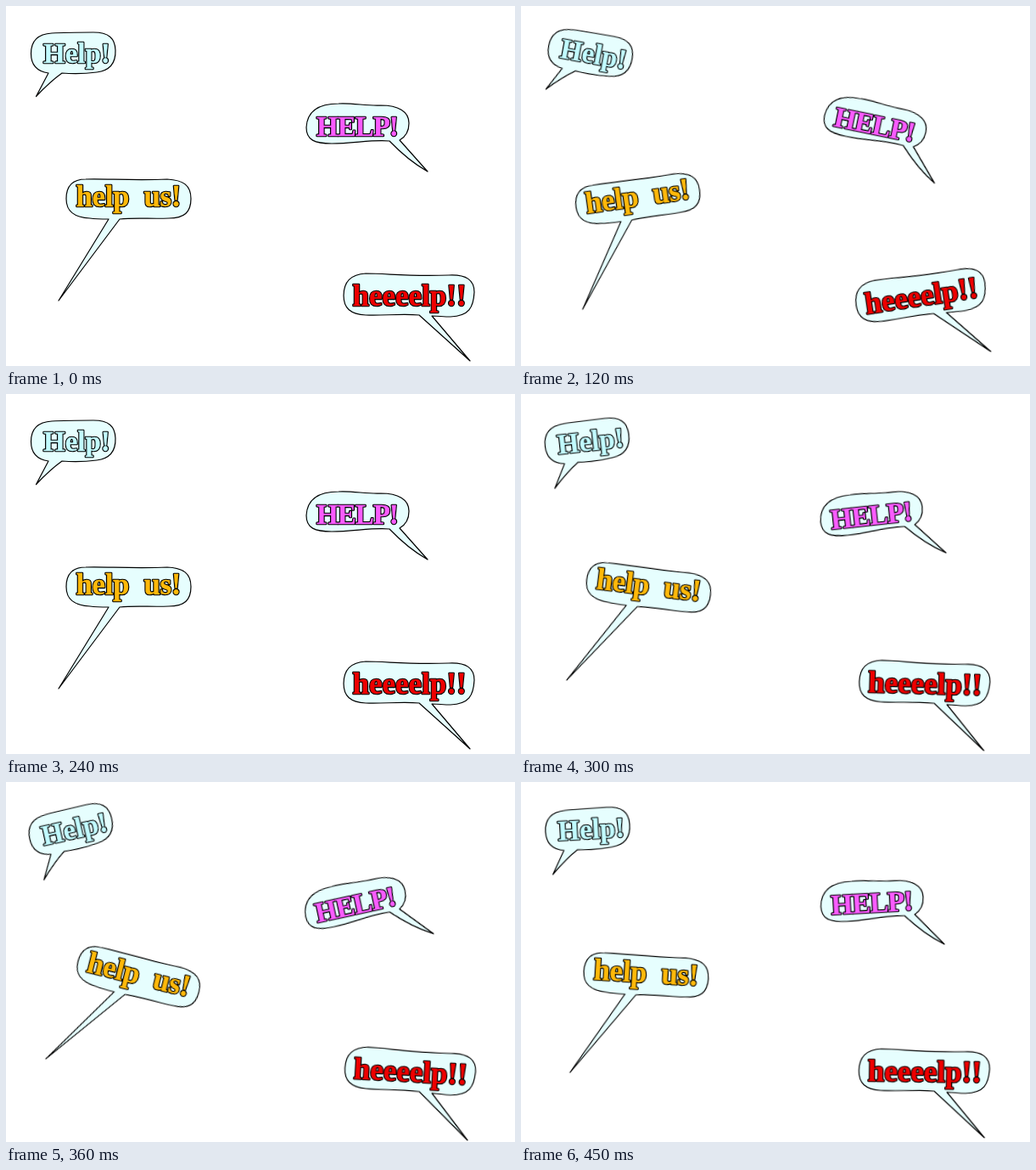
An HTML page for the animation above (480 ms loop, 600 px wide and 424 px high).

```html
<!DOCTYPE html>
<html lang="en">
<head>
<meta charset="utf-8">
<title>Help bubbles</title>
<style>
  html, body { margin: 0; width: 100%; height: 100%; overflow: hidden; background: #fff; }
  svg { display: block; width: 100%; height: 100%; }

  .bubble {
    transform-origin: var(--pivot);
    animation: rock 480ms infinite steps(4, end);
  }
  .bubble path {
    fill: #e6fefe;
    stroke: #000;
    stroke-width: 1.2;
    stroke-linejoin: round;
  }
  text {
    font: bold 35px "Liberation Serif", "Times New Roman", serif;
    stroke-linejoin: round;
  }
  .edge { fill: #000; stroke: #000; stroke-width: 2.6; }
  .face { fill: var(--ink); stroke: var(--ink); stroke-width: .3; }

  /* Each quarter of the loop moves in four hard steps */
  @keyframes rock {
    0%, 50%, 100% { transform: rotate(0deg); }
    25% { transform: rotate(var(--a)); }
    75% { transform: rotate(var(--b)); }
  }

  #one   { --pivot: 79.5px 68.5px;   --a: 10.4deg; --b: -12.5deg; --ink: #c2fbff; }
  #two   { --pivot: 425px 154.5px;   --a: 11.6deg; --b: -12.3deg; --ink: #f95cff; }
  #three { --pivot: 140px 275.5px;   --a: -8deg;   --b: 14deg;    --ink: #ffb90a; }
  #four  { --pivot: 475px 366.5px;   --a: -8.4deg; --b: 3.2deg;   --ink: #ee0000; }

  #say1 { font-size: 33px; }
  #say2 { font-size: 33px; letter-spacing: -1px; }
  #say3 { letter-spacing: -.4px; word-spacing: 9px; }
</style>
</head>
<body>
<svg viewBox="0 0 600 424">
  <defs>
    <text id="say1" x="44" y="67">Help!</text>
    <text id="say2" x="366" y="153">HELP!</text>
    <text id="say3" x="82.5" y="236">help us!</text>
    <text id="say4" x="408.5" y="353">heeeelp!!</text>
  </defs>

  <g id="one" class="bubble">
    <path d="M50 79C36 77 29.5 69 29.5 56C29.5 42 36 33 54 32C70 31 85 31 103 31C121 31 128.5 38 129 52C129.5 67 123 76 107 78C92 80 78 80 66 79Q52 89 35.5 106.5Z"/>
    <use href="#say1" class="edge"/><use href="#say1" class="face"/>
  </g>

  <g id="two" class="bubble">
    <path d="M452 159C432 157 410 162 384 162C364 162 354 158 354 143C355 124 368 115 392 115C410 114 425 118 442 117C462 117 475 124 475 138C475 147 471 154 464 158L497 195Q474 182 452 159Z"/>
    <use href="#say2" class="edge"/><use href="#say2" class="face"/>
  </g>

  <g id="three" class="bubble">
    <path d="M121 251C113 251 106 251 99 250C80 249 71 242 71 227C71 211 79 204 94 204C115 203 150 206 190 204C209 205 218 211 218 227C218 243 210 250 192 250C172 251 152 249 134 251L62 347Z"/>
    <use href="#say3" class="edge"/><use href="#say3" class="face"/>
  </g>

  <g id="four" class="bubble">
    <path d="M487 364C465 362 445 365 424 364C406 363 398 356 398 341C398 324 407 316 424 315C450 315 475 319 522 317C543 316 552 323 552 337C551 355 546 365 524 366C516 366 509 365 502 365L547 418Z"/>
    <use href="#say4" class="edge"/><use href="#say4" class="face"/>
  </g>
</svg>
</body>
</html>
```
